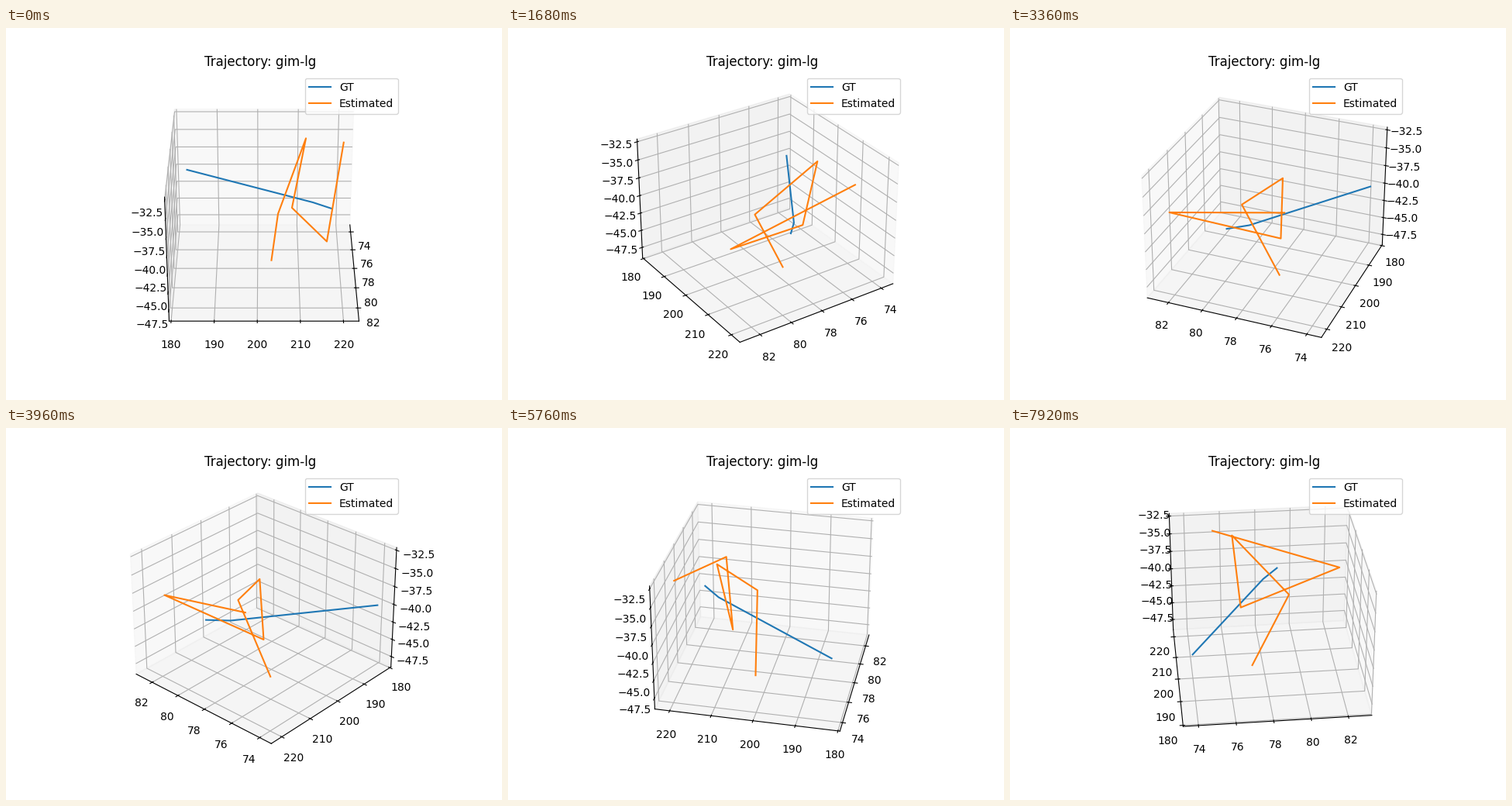
These frames come from a looping animation (640 by 480 pixels, 8000 ms). A matplotlib script:

```python
import matplotlib.pyplot as plt
from matplotlib.animation import FuncAnimation

TICK = 40      # ms between drawn frames
HOLD = 3       # drawn frames per rotation step
FRAMES = 200   # 8000 ms loop
STEP = 4       # degrees per rotation step

ground_truth = [
    (73.83, 182.34, -40.04),
    (78.23, 213.19, -39.22),
    (79.11, 217.47, -38.95),
]
estimated = [
    (77.38, 203.38, -48.69),
    (79.46, 204.85, -39.24),
    (76.48, 211.54, -32.47),
    (76.86, 208.35, -41.74),
    (82.62, 215.83, -38.86),
    (75.55, 220.80, -34.12),
]

fig = plt.figure(figsize=(6.4, 4.8), dpi=100)
ax = fig.add_subplot(projection="3d")
ax.plot(*zip(*ground_truth), label="GT")
ax.plot(*zip(*estimated), label="Estimated")
ax.set_xlim(73.19, 83.26)
ax.set_ylim(179.54, 223.60)
ax.set_zlim(-49.03, -32.13)
ax.set_title("Trajectory: gim-lg")
ax.legend(loc="upper right")


def rotate(i):
    # A hair above zero keeps the side wall on the left in the edge-on view
    azim = max(STEP * (i // HOLD), 0.01)
    ax.view_init(elev=30, azim=azim)
    return []


anim = FuncAnimation(fig, rotate, frames=FRAMES, interval=TICK,
                     init_func=lambda: rotate(0), repeat=True, repeat_delay=0)
plt.show()
```
